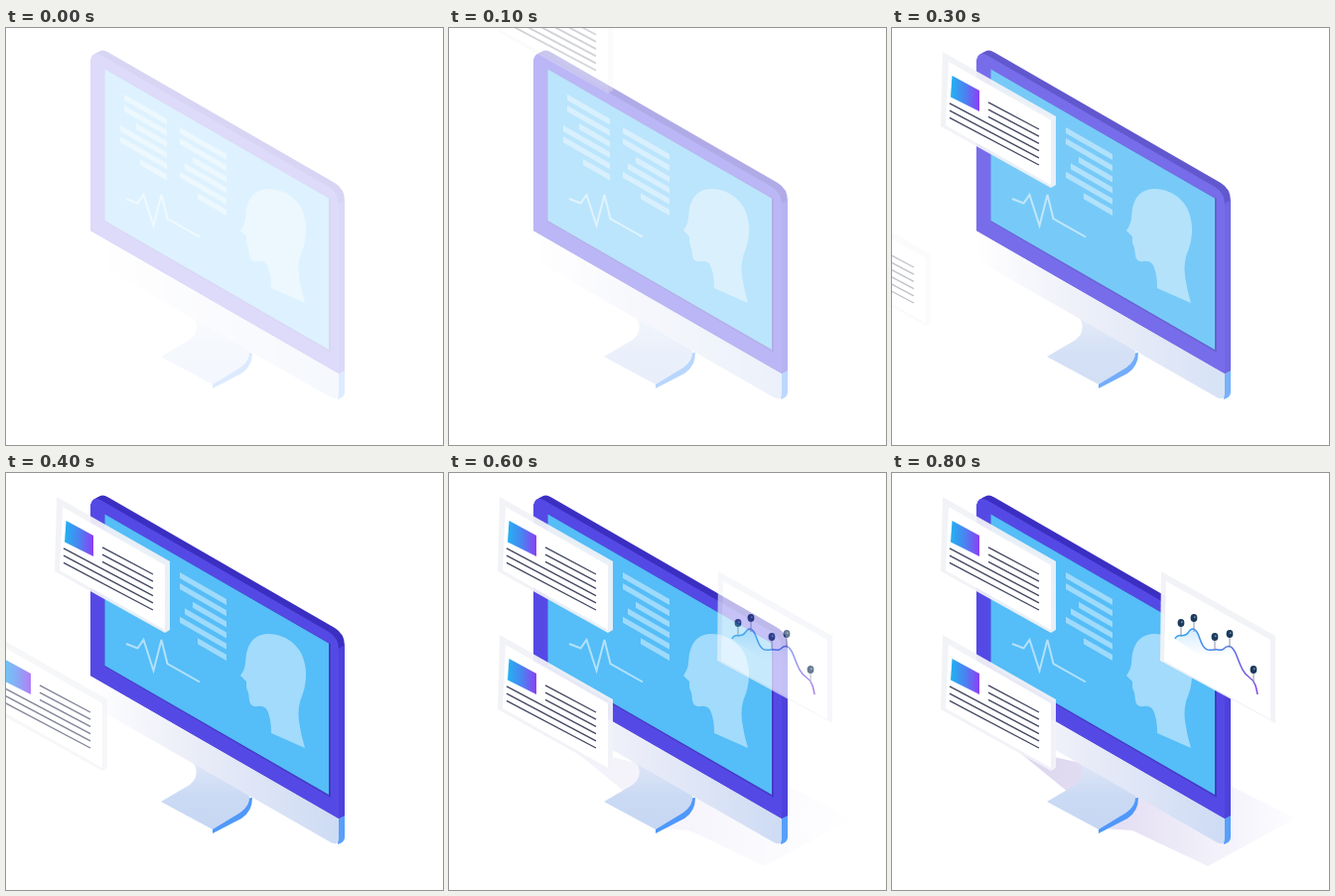
Write an HTML page that moves like this. It is 440 px wide and 420 px high and loops after 900 ms.

```html
<!DOCTYPE html>
<html lang="en">
<head>
<meta charset="utf-8">
<title>Health dashboard</title>
<style>
html, body { margin: 0; width: 100%; height: 100%; overflow: hidden; background: #fff; }
svg { display: block; width: 440px; height: 420px; }
svg > g { animation: 900ms step-end infinite; }
#monitor { animation-name: monitor; }
#top-card { animation-name: top-card; }
#low-card { animation-name: low-card; }
#chart { animation-name: chart; }
#shadow { animation-name: shadow; }

/* Percentages sit just below multiples of 100 ms. */
@keyframes monitor {
  0% { opacity: .2; animation-timing-function: steps(4, end); }
  44.4%, 100% { opacity: 1; }
}
@keyframes top-card {
  0% { opacity: 0; transform: translateY(-143px); animation-timing-function: steps(3, end); }
  33.3%, 100% { opacity: 1; transform: none; }
}
@keyframes low-card {
  0% { opacity: 0; transform: translateX(-189px); }
  22.2% { opacity: 0; transform: translateX(-189px); animation-timing-function: steps(3, end); }
  55.5%, 100% { opacity: 1; transform: none; }
}
@keyframes chart {
  0% { opacity: 0; }
  44.4% { opacity: 0; animation-timing-function: steps(3, end); }
  77.7%, 100% { opacity: 1; }
}
@keyframes shadow {
  0% { opacity: 0; }
  55.5% { opacity: 0; animation-timing-function: steps(3, end); }
  88.8%, 100% { opacity: 1; }
}
</style>
</head>
<body>
<svg viewBox="0 0 440 420">
  <defs>
    <linearGradient id="chin">
      <stop offset="0" stop-color="#fff"/>
      <stop offset=".4" stop-color="#ebedf8"/>
      <stop offset="1" stop-color="#cddbf4"/>
    </linearGradient>
    <linearGradient id="base" x1="0" y1="0" x2="0" y2="1">
      <stop offset="0" stop-color="#e0e7f7"/>
      <stop offset=".5" stop-color="#cbdaf4"/>
      <stop offset="1" stop-color="#c6d7f3"/>
    </linearGradient>
    <linearGradient id="picture">
      <stop offset="0" stop-color="#22b2f2"/>
      <stop offset=".5" stop-color="#4a83f0"/>
      <stop offset="1" stop-color="#8c3ff4"/>
    </linearGradient>
    <linearGradient id="line">
      <stop offset="0" stop-color="#31a8f3"/>
      <stop offset=".6" stop-color="#4c7bea"/>
      <stop offset="1" stop-color="#8345e0"/>
    </linearGradient>
    <linearGradient id="area" x1="0" y1="0" x2="0" y2="1">
      <stop offset="0" stop-color="#79c5fa" stop-opacity=".35"/>
      <stop offset=".45" stop-color="#b5d8fb" stop-opacity="0"/>
    </linearGradient>
    <linearGradient id="ground">
      <stop offset="0" stop-color="#dcd6ee"/>
      <stop offset=".4" stop-color="#e5e0f4"/>
      <stop offset=".7" stop-color="#f2f0fa"/>
      <stop offset="1" stop-color="#fdfdff"/>
    </linearGradient>
    <path id="curve" d="M285 167C288 160 294 167 298 161S306 155 310 167 318 179 324 178 331 180 334 177 342 171 347 184 354 202 360 206 367 217 368 223"/>
    <g id="card">
      <path d="M51 24 165 89V158L160 161 49 99Z" fill="#f2f3f7" opacity=".94"/>
      <path d="M57 34 160 93V158L54 98Z" fill="#fff"/>
      <path d="M60.5 48 88 63V84L59 69.5Z" fill="url(#picture)"/>
      <path class="rows" fill="none" stroke="#444a63" stroke-width="1.4"/>
    </g>
  </defs>

  <g id="shadow">
    <path d="M123 277 190 292 341 315 406 348 318 396 242 360 212 358 200 340Z" fill="url(#ground)"/>
  </g>

  <g id="monitor">
    <path d="M208 358V363L237 348Q248 341 248 327L240 328Z" fill="#4f98fa"/>
    <path d="M156 331 185 314Q194 307 191 296L187 290 245 325Q246 335 236 342L208 359Z" fill="url(#base)"/>
    <path d="M335 348 341 345V367Q341 372 334 374Z" fill="#579ffa"/>
    <path d="M85 204 335 348V368Q335 376 327 372L93 238Q85 234 85 226Z" fill="url(#chin)"/>
    <path d="M85 35Q85 28 91 25L95 23Q98 21.5 103 24.5L331 156Q341 162 341 174V345L335 348 85 204Z" fill="#3b2fc2"/>
    <path d="M335 177 341 173V345L335 348Z" fill="#4d42dc"/>
    <path d="M85 36Q85 23 95 27L325 160Q335 166 335 178V348L85 204Z" fill="#5549e6"/>
    <path d="M99.5 41.5 327 172V327L99.5 195Z" fill="#4339c4"/>
    <path d="M99.5 41.5 325 171.5V324L99.5 194Z" fill="#55bdf7"/>
    <path id="paragraphs" fill="#fff" opacity=".43"/>
    <path d="M121 172 132.5 176.5 138.5 168 148.5 199 156.5 168 162.5 192 195 210.5" fill="none" stroke="#fff" stroke-opacity=".55" stroke-width="2"/>
    <path d="M242 182Q246 162 265 162Q286 163 297 181Q306 200 299 222Q293 235 295 250Q297 264 301 277L267 262Q267 247 263 239Q260 234 253 235Q246 236 245 229Q245 222 242 216L242 210 236 204Q241 197 241 191Z" fill="#fff" opacity=".45"/>
  </g>

  <g id="top-card"><use href="#card"/></g>
  <g id="low-card"><use href="#card" y="139"/></g>

  <g id="chart">
    <path d="M271 99 386 164V252L270 189Z" fill="#f2f3f7" opacity=".96"/>
    <path d="M276 109 381 168V248L274 189Z" fill="#fff"/>
    <use href="#curve" fill="url(#area)"/>
    <use href="#curve" fill="none" stroke="url(#line)" stroke-width="1.5"/>
    <g id="pins"></g>
  </g>
</svg>
<script>
// Slanted bars that share a right edge.
const bars = (starts, right, bottom) => starts.map((x, i) => {
  const y = bottom + i * 11.2, left = y - (right - x) * .577;
  return `M${x} ${left - 6}L${right} ${y - 6}V${y}L${x} ${left}Z`;
}).join('');
document.getElementById('paragraphs').setAttribute('d',
  bars([119, 119, 131, 115, 115, 135], 162, 97.5) + bars([175, 175, 188, 180, 175, 193], 222, 133));

const rows = [97, 97, 97, 58, 58, 58].map((x, i) => {
  const y = 102 + i * 7.2;
  return `M${x} ${y - (148 - x) * .53}L148 ${y}`;
}).join('');
document.querySelector('.rows').setAttribute('d', rows);

document.getElementById('pins').innerHTML =
  [[291, 151], [304, 146], [325, 165], [340, 162], [364, 198]].map(([x, y]) =>
    `<path d="M${x} ${y}v14" stroke="#8b93a8"/>
     <ellipse cx="${x}" cy="${y}" rx="3.4" ry="3.9" fill="#1b3a5c"/>
     <circle cx="${x + .8}" cy="${y - .8}" r="1" fill="#6f8fb0"/>`).join('');
</script>
</body>
</html>
```
